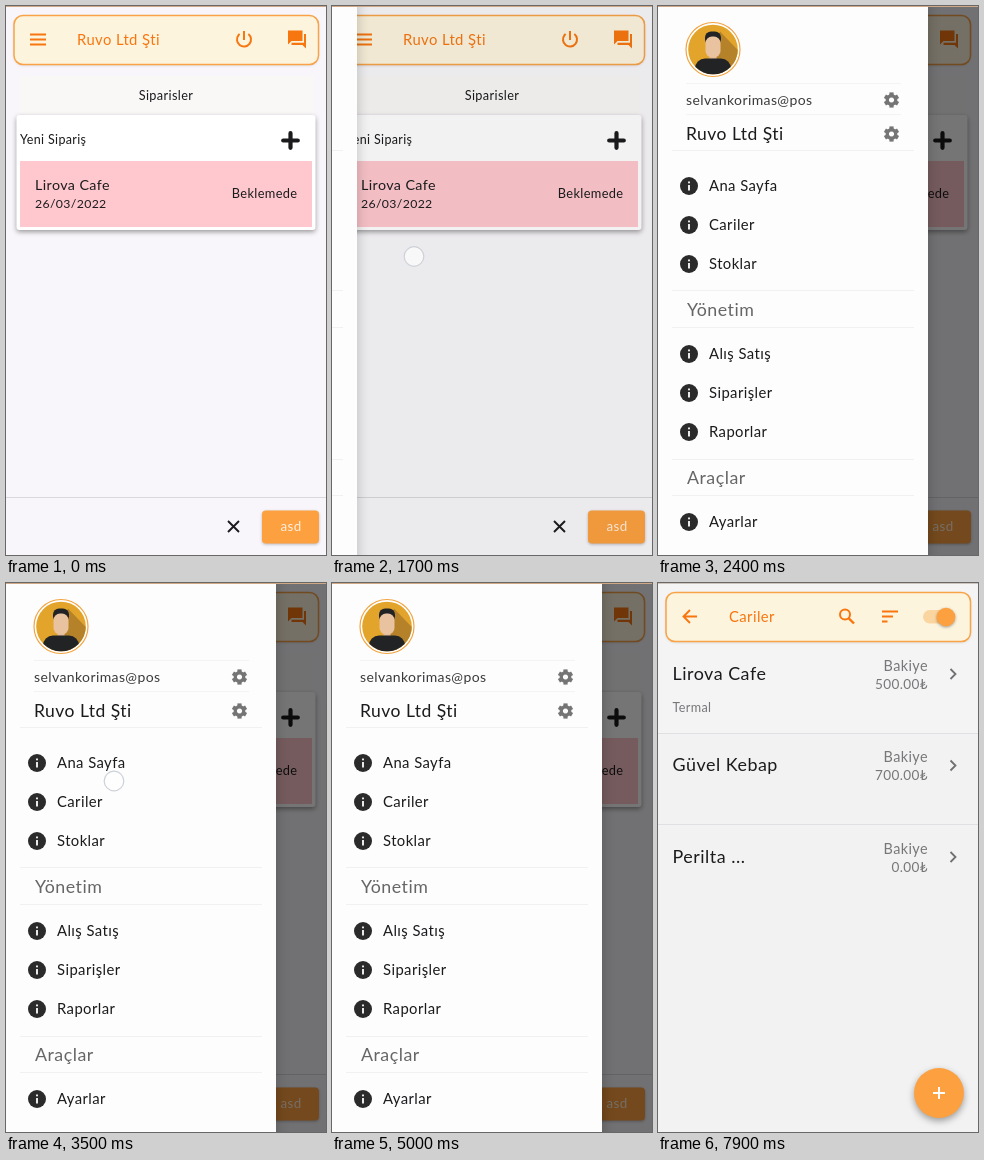
An HTML page with a canvas that plays this animation: 320 px wide and 549 px high, repeating every 8000 ms.

```html
<!DOCTYPE html>
<html lang="tr">
<head>
<meta charset="utf-8">
<title>Siparisler</title>
<style>
html, body { margin: 0; width: 100%; height: 100%; overflow: hidden; background: #f8f6fa; }
canvas { display: block; width: 320px; height: 549px; }
</style>
</head>
<body>
<canvas id="stage"></canvas>
<script>
const W = 320, H = 549, LOOP = 8000, STEP = 100, DRAWER = 270;
const ORANGE = '#f8760f', AMBER = '#fda03f', INK = '#1b1b1d';
const canvas = document.getElementById('stage');
const ctx = canvas.getContext('2d');
const dpr = window.devicePixelRatio || 1;
canvas.width = W * dpr;
canvas.height = H * dpr;

const clamp = v => Math.max(0, Math.min(1, v));

// Value at time t along [time, value] points; null outside them when bounded.
function track(points, t, bounded) {
  const last = points[points.length - 1];
  if (t < points[0][0]) return bounded ? null : points[0][1];
  if (t > last[0]) return bounded ? null : last[1];
  for (let i = 1; i < points.length; i++) {
    const [t0, a] = points[i - 1], [t1, b] = points[i];
    if (t <= t1) return a + (b - a) * (t - t0) / (t1 - t0);
  }
  return last[1];
}

function text(str, x, y, size, color = INK, align = 'left') {
  ctx.font = `400 ${size * 1.06}px Lato, "Open Sans", sans-serif`;
  ctx.letterSpacing = (size * 0.03).toFixed(2) + 'px';
  ctx.textAlign = align;
  ctx.fillStyle = color;
  ctx.fillText(str, x, y + size * 0.36);
}

function rect(x, y, w, h, color) {
  ctx.fillStyle = color;
  ctx.fillRect(x, y, w, h);
}

function round(x, y, w, h, r, fill, stroke, line = 1.5) {
  ctx.beginPath();
  ctx.roundRect(x, y, w, h, r);
  if (fill) { ctx.fillStyle = fill; ctx.fill(); }
  if (stroke) { ctx.strokeStyle = stroke; ctx.lineWidth = line; ctx.stroke(); }
}

function disc(x, y, r, fill, stroke, line = 1) {
  ctx.beginPath();
  ctx.arc(x, y, r, 0, 2 * Math.PI);
  if (fill) { ctx.fillStyle = fill; ctx.fill(); }
  if (stroke) { ctx.strokeStyle = stroke; ctx.lineWidth = line; ctx.stroke(); }
}

// Each path is a flat list x, y, x, y, ... relative to (cx, cy).
function lines(cx, cy, color, width, paths, cap = 'butt') {
  ctx.strokeStyle = color;
  ctx.lineWidth = width;
  ctx.lineCap = cap;
  ctx.beginPath();
  for (const p of paths) {
    ctx.moveTo(cx + p[0], cy + p[1]);
    for (let i = 2; i < p.length; i += 2) ctx.lineTo(cx + p[i], cy + p[i + 1]);
  }
  ctx.stroke();
}

function shadowed(color, blur, dy, draw) {
  ctx.save();
  ctx.shadowColor = color;
  ctx.shadowBlur = blur * dpr;
  ctx.shadowOffsetY = dy * dpr;
  draw();
  ctx.restore();
}

function polygon(points, color) {
  ctx.beginPath();
  points.forEach(([x, y]) => ctx.lineTo(x, y));
  ctx.closePath();
  ctx.fillStyle = color;
  ctx.fill();
}

function appBar(title) {
  shadowed('rgba(0,0,0,.14)', 3, 1, () => round(8, 9.5, 304.5, 49, 9, '#fdf4de'));
  round(8, 9.5, 304.5, 49, 9, null, '#f8a347');
  text(title, 71, 34, 14, ORANGE);
}

function chatIcon(x, y) {
  polygon([[x - 9, y - 9], [x + 5.5, y - 9], [x + 5.5, y + 1.5], [x - 5.5, y + 1.5], [x - 9, y + 5]], ORANGE);
  polygon([[x + 7, y - 5.5], [x + 9, y - 5.5], [x + 9, y + 9], [x + 5.5, y + 5.5],
    [x - 5.5, y + 5.5], [x - 5.5, y + 3.3], [x + 7, y + 3.3]], ORANGE);
}

function powerIcon(x, y) {
  lines(x, y, ORANGE, 2, [[0, -8, 0, 1]]);
  ctx.beginPath();
  ctx.arc(x, y + 0.5, 7, -0.9, Math.PI + 0.9);
  ctx.stroke();
}

function ordersPage() {
  rect(0, 0, W, H, '#f8f6fa');
  rect(13, 70, 295, 38, '#f9f8f7');
  appBar('Ruvo Ltd Şti');
  lines(32, 33.5, ORANGE, 1.9, [[-8, -5, 8, -5], [-8, 0, 8, 0], [-8, 5, 8, 5]]);
  powerIcon(238, 33);
  chatIcon(291, 33.5);
  text('Siparisler', 160, 90, 12, INK, 'center');

  shadowed('rgba(0,0,0,.38)', 5, 2, () => round(10.5, 109, 299, 115, 3, '#fff'));
  text('Yeni Sipariş', 14, 134, 11.8);
  lines(284.5, 134.5, INK, 4.2, [[-7.3, 0, 7.3, 0], [0, -7.3, 0, 7.3]], 'round');
  rect(14, 155, 292, 66, '#ffc8ce');
  text('Lirova Cafe', 29, 179, 13.5);
  text('26/03/2022', 29, 198, 11.6);
  text('Beklemede', 291.5, 188, 12.1, INK, 'right');

  rect(0, 491, W, 1, '#d9d7db');
  lines(227.5, 520.5, INK, 1.9, [[-5.5, -5.5, 5.5, 5.5], [5.5, -5.5, -5.5, 5.5]]);
  shadowed('rgba(0,0,0,.25)', 3, 1, () => round(256, 504.5, 57, 33, 4, AMBER));
  text('asd', 285, 520.5, 12.6, '#fff0df', 'center');
}

function gear(x, y) {
  ctx.save();
  ctx.translate(x, y);
  for (let i = 0; i < 6; i++) {
    rect(-2.1, -7.6, 4.2, 5, '#757575');
    ctx.rotate(Math.PI / 3);
  }
  disc(0, 0, 4.3, null, '#757575', 3.2);
  ctx.restore();
}

function avatar(x, y) {
  disc(x, y, 27, '#fff', '#f2a440', 1.2);
  ctx.save();
  disc(x, y, 24.8, '#e2a42a');
  ctx.clip();
  polygon([[x + 7, y - 18], [x + 30, y + 6], [x + 30, y + 30], [x - 8, y + 30]], '#b5822a');
  round(x - 3.5, y + 1, 7, 12, 2, '#e2b995');
  round(x - 18, y + 9, 36, 26, 10, '#222325');
  round(x - 8, y - 18, 16, 14, 6, '#222325');
  round(x - 7.5, y - 13, 15, 21, 6.5, '#e9c2a0');
  ctx.restore();
}

function infoRow(label, y) {
  disc(31, y, 9, '#2b2b2c');
  rect(30.1, y - 4.5, 1.8, 1.8, '#fff');
  rect(30.1, y - 1, 1.8, 5.5, '#fff');
  text(label, 51, y, 14);
}

function drawer(edge, ripple) {
  if (edge <= 0) return;
  rect(0, 0, W, H, `rgba(0,0,0,${0.54 * edge / DRAWER})`);
  ctx.save();
  ctx.translate(edge - DRAWER, 0);
  shadowed('rgba(0,0,0,.22)', 12, 3, () => rect(0, -10, DRAWER, H + 20, '#fdfdfd'));
  ctx.save();
  ctx.beginPath();
  ctx.rect(0, 200, DRAWER, 39);
  ctx.clip();
  if (ripple > 0) disc(78, 219, 200 * ripple, 'rgba(0,0,0,.08)');
  ctx.restore();

  avatar(55, 43.5);
  for (const y of [77, 108]) rect(28, y, 215, 1, '#f3f3f3');
  for (const y of [144, 284, 321, 453, 489]) rect(14, y, 242, 1, '#f1f1f1');
  text('selvankorimas@pos', 28, 94, 13.2, '#3a3a3c');
  text('Ruvo Ltd Şti', 28, 128, 16.5);
  gear(233.5, 94);
  gear(233.5, 128);
  ['Ana Sayfa', 'Cariler', 'Stoklar'].forEach((s, i) => infoRow(s, 180 + 39 * i));
  text('Yönetim', 29, 304, 16.8, '#666');
  ['Alış Satış', 'Siparişler', 'Raporlar'].forEach((s, i) => infoRow(s, 348 + 39 * i));
  text('Araçlar', 29, 471.5, 16.8, '#666');
  infoRow('Ayarlar', 516);
  ctx.restore();
}

function accountsPage() {
  rect(0, 0, W, H, '#f2f2f2');
  rect(0, 0, W, 150, '#f4f4f5');
  appBar('Cariler');
  lines(32, 33.5, ORANGE, 1.9, [[7, 0, -6, 0], [0, -6.5, -6.5, 0, 0, 6.5]]);
  disc(187, 31.5, 5, null, ORANGE, 2);
  lines(187, 31.5, ORANGE, 2.4, [[3.8, 3.8, 9, 9]]);
  lines(232, 33.5, ORANGE, 1.9, [[-8, -5, 8, -5], [-8, 0, 3, 0], [-8, 5, -2.5, 5]]);
  round(265, 27, 30, 13.5, 6.75, '#fbd5a0');
  shadowed('rgba(0,0,0,.35)', 3, 1, () => disc(288, 34, 9.3, AMBER));

  const rows = [['Lirova Cafe', '500.00₺'], ['Güvel Kebap', '700.00₺'], ['Perilta ...', '0.00₺']];
  rows.forEach(([name, sum], i) => {
    const y = 90.5 + 91.5 * i;
    text(name, 14.5, y, 16.9);
    text('Bakiye', 270, y - 7.5, 13.6, '#77777a', 'right');
    text(sum, 270, y + 10.5, 12.8, '#77777a', 'right');
    lines(295, y + 0.5, '#707073', 1.8, [[-2.5, -5, 2.5, 0, -2.5, 5]]);
  });
  text('Termal', 14.5, 125, 11.9, '#77777a');
  rect(0, 150, W, 1, '#e0e0e4');
  rect(0, 241, W, 1, '#e0e0e4');

  shadowed('rgba(0,0,0,.36)', 7, 3, () => disc(281, 510, 25, AMBER));
  lines(281, 510, '#fff', 1.9, [[-6, 0, 6, 0], [0, -6, 0, 6]]);
}

const EDGE = [[1600, 0], [1700, 25], [1800, 150], [1900, 234], [2000, 260], [2100, 268], [2200, 270]];
const TOUCHES = [
  { x: [[1400, 8], [1500, 22], [1600, 46], [1700, 82], [1800, 160]], y: 250.5 },
  { x: [[3400, 108], [3600, 108]], y: 198 },
  { x: [[7300, 78], [7400, 78]], y: 219 }
];

function draw(t) {
  ctx.setTransform(dpr, 0, 0, dpr, 0, 0);
  ctx.globalAlpha = 1;
  const enter = clamp((t - 7500) / 300);
  if (enter < 1) {
    ordersPage();
    drawer(track(EDGE, t), clamp((t - 7300) / 300));
  }
  if (enter > 0) {
    ctx.save();
    ctx.globalAlpha = enter * enter;
    ctx.translate(0, H * 0.25 * Math.pow(1 - enter, 3));
    accountsPage();
    ctx.restore();
  }
  rect(0, 0, W, 1, enter < 1 ? '#cfa987' : '#cbc5be');
  for (const touch of TOUCHES) {
    const x = track(touch.x, t, true);
    if (x !== null) disc(x, touch.y, 9.8, 'rgba(255,255,255,.65)', '#cdd1d8', 1.2);
  }
}

const start = performance.now();
function tick() {
  const t = (performance.now() - start) % LOOP;
  draw(Math.floor(t / STEP) * STEP);
  requestAnimationFrame(tick);
}
tick();
</script>
</body>
</html>
```
